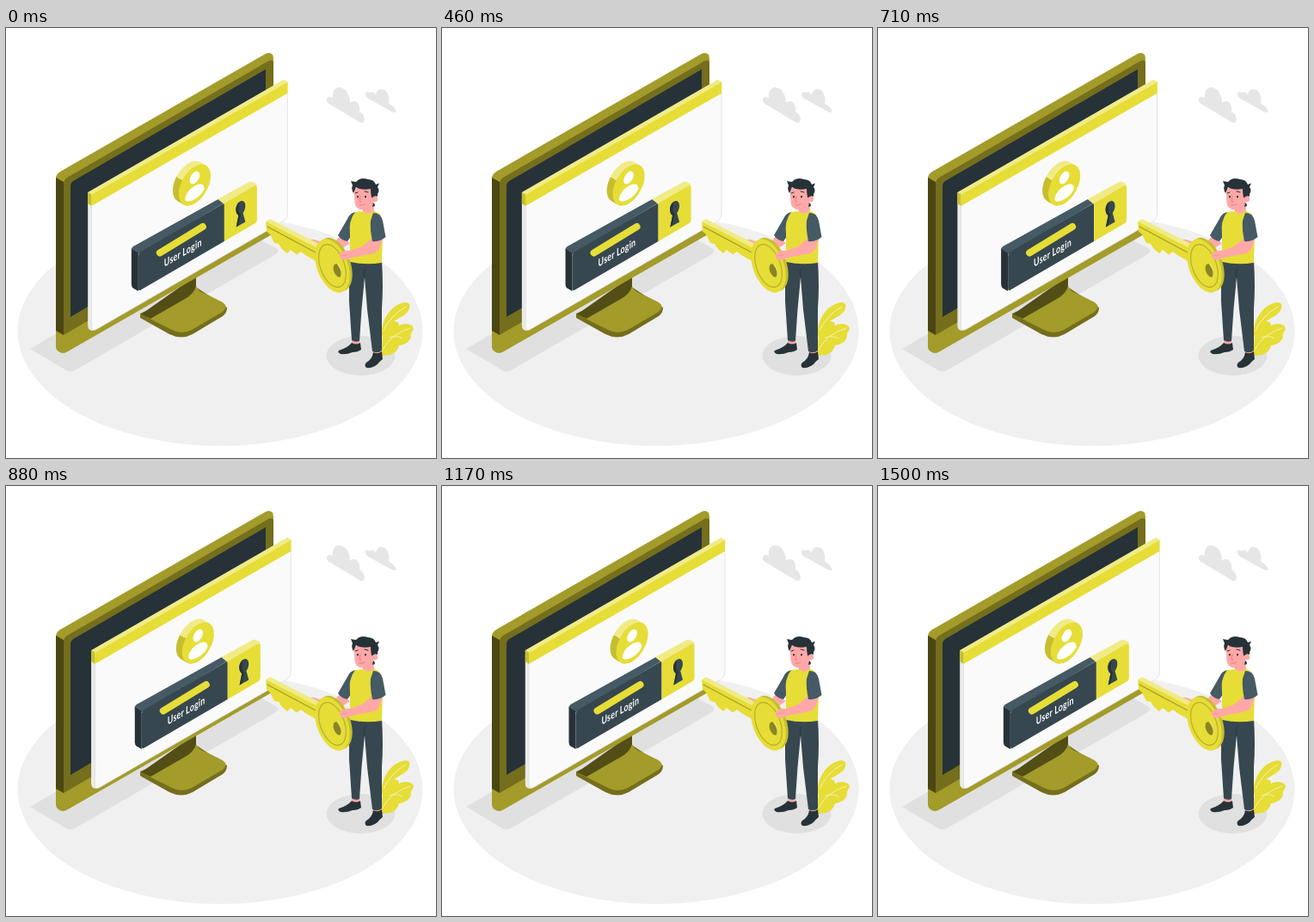
An HTML page that plays this animation: 500x500 px, repeating every 1540 ms.

```html
<!DOCTYPE html>
<html lang="en">
<head>
<meta charset="utf-8">
<title>User login</title>
<style>
html, body { margin: 0; width: 100%; height: 100%; overflow: hidden; background: #fff; }
svg { display: block; width: 100vw; height: 100vh; }
.y { fill: #e6dd37; } .yl { fill: #f0eb87; } .yd { fill: #c6be2f; }
.d { fill: #37474f; } .dd { fill: #263238; } .dl { fill: #455a64; }
.o { fill: #a39b2a; } .om { fill: #746e1d; } .od { fill: #4b4612; }
.g { fill: #e0e0e0; } .s { fill: #ffa8a7; }
.line { fill: none; stroke-linecap: round; stroke-linejoin: round; }
</style>
</head>
<body>
<svg viewBox="0 0 500 500">
  <defs>
    <linearGradient id="rim" gradientUnits="userSpaceOnUse" x1="-22" y1="8" x2="8" y2="-22">
      <stop offset=".45" stop-color="#c6be2f"/><stop offset=".45" stop-color="#f0eb87"/>
    </linearGradient>
  </defs>

  <!-- ground -->
  <ellipse cx="249" cy="352.5" rx="235.5" ry="133.5" fill="#f0f0f0"/>
  <path class="g" d="M28 373 L290 222 L290 243 L314 256 Q319 259 314 263 L80 398 Q75 401 70 398Z"/>
  <ellipse class="g" cx="412.5" cy="381" rx="40" ry="23"/>

  <!-- clouds -->
  <g fill="#e6e6e6">
    <path d="M373 84 Q373 78 380 81 Q379 71 386 69 Q395 68 399 80 Q400 83 400 87 Q406 82 410 89 Q412 93 411 97 Q416 100 417 106 Q417 111 412 110 L377 89 Q373 87 373 84Z"/>
    <path d="M418 77 Q418 73 422 75 Q428 73 430 78 Q430 72 436 71 Q443 71 445 80 Q446 84 445 88 Q450 90 453 95 Q455 99 450 98 L421 82 Q418 80 418 77Z"/>
  </g>

  <!-- plant -->
  <path class="y" d="M437 360 C435 340 447 322 464 319 Q471 319 469 326 C466 337 449 337 441 352Z"/>
  <path class="y" d="M437 381 C437 352 440 343 451 341 Q457 341 457 346 Q465 342 472 346 Q476 349 471 355 Q472 363 464 367 Q460 369 457 369 Q455 377 447 380Z"/>
  <path class="line" stroke="#f6f2ae" d="M439 352 Q446 335 465 324 M438 374 Q447 356 470 349 M446 360 Q455 357 461 361"/>

  <!-- stand -->
  <path class="om" d="M156 332 V337 L190 356 Q204 363 217 356 L252 335 Q257 331 257 325 L222 302Z"/>
  <path class="o" d="M221 286 V300 Q223 307 234 310 L252 319 Q259 324 252 330 L216 351 Q204 357 193 351 L157 333 L221 297Z"/>
  <path d="M157 333 L221 288 V300 Q219 309 208 315 L168 338Z" fill="#534e16"/>

  <!-- monitor -->
  <path class="o" d="M58 175 Q58 170 63 167 L300 31 Q306 27 310 31 Q311 33 311 39 V239 L72 376 Q66 380 61 376 Q58 374 58 370Z"/>
  <path class="om" d="M67 181 Q67 177 71 174 L304 39 Q311 35 311 42 V215 L67 357Z"/>
  <path class="od" d="M58 174 L67 179 V357 L58 352Z"/>
  <path class="dd" d="M75 183 Q75 180 78 178 L302 48 V202 L75 336Z"/>

  <!-- floating window -->
  <g id="win">
    <path d="M95.300 191 L100 194 V351 L102 352 Q95.300 352 95.300 346Z" fill="#ebebeb"/>
    <path d="M99.500 205 L327.500 75 V216 Q327.500 222 322.500 225 L106 350 Q99.500 354 99.500 348Z" fill="#fafafa" stroke="#dadada" stroke-width=".7"/>
    <path class="yl" d="M95.300 191 L323 60 L327.700 62.500 V66 L99.500 196Z"/>
    <path class="yd" d="M95.300 191 L99.500 193.500 V207 L95.300 204Z"/>
    <path class="y" d="M99.500 194 L327.700 63 V75.800 L99.500 207Z"/>

    <g transform="matrix(.866 -.5 0 1 219.5 182.5)">
      <path class="line" stroke="url(#rim)" stroke-width="42.8" d="M0 0 L-8 -8"/>
      <circle class="y" r="21.4"/>
      <circle cy="-8.500" r="6.700" fill="#fff"/>
      <path d="M-13 11 C-13 -2 13 -2 13 11 C9 18.500 -9 18.500 -13 11Z" fill="#fff"/>
    </g>

    <path class="dl" d="M146 258 Q146 255 149 253.500 L247 199 L254.500 203 L154 263Z"/>
    <path class="dd" d="M146 257 L154 262 V306 L148 302.500 Q146 301 146 298Z"/>
    <path class="d" d="M154 265 Q154 262 157 260 L254 203.500 V248 L157 304.500 Q154 306 154 303Z"/>
    <path class="yl" d="M246.500 199 L283 179 Q285 178 287 179 L292 182 L254 205Z"/>
    <path class="y" d="M254 204 L289 183.500 Q292 182 292 185 V223 Q292 225.500 290 227 L254 248Z"/>
    <path class="d" d="M267.500 211 C267.500 204 272 200.500 275 201 C280 202 279 211 275.700 215 L278.500 225.500 L267.800 231.500 L270.500 218 Q267.500 216 267.500 211Z"/>
    <path class="dd" d="M272 203 Q267.500 206 267.500 211 Q267.500 216 270.500 218 L267.800 231.500 L270 230 L273 217 Q269 213 272 203Z"/>
    <path class="line" stroke="#e6dd37" stroke-width="8" d="M179 261.500 L229 231"/>
    <text transform="matrix(.71 -.41 0 1 184 278)" font-family="Lato, sans-serif" font-size="12.500" font-weight="700" letter-spacing=".3" fill="#fff">User Login</text>
  </g>

  <!-- person: far arm and legs -->
  <path class="s" d="M388 242 L380 252 L364 248 Q356 244 352 247 Q351 250 356 252 L380 264 L400 250Z"/>
  <path class="dl" d="M406 214 Q400 215 397 222 L386 241 Q390 247 397 248 L405 237Z"/>
  <path class="s" d="M402 361 H411 V370 L402 371Z M428 372 H436 V382 L428 383Z"/>
  <path class="d" d="M399 270 L437 271 Q439 300 437 327 L437 375 Q432 379 426 376 L420 327 L417 290 L413.500 327 L411 364 Q406 366 402 363 L399 318Z"/>
  <path class="line" stroke="#263238" stroke-width=".8" d="M417 290 Q415 283 418 280"/>
  <path class="dd" d="M402 366 Q407 369 412 366 L413 374 Q409 377 403 377 Q396 380 389 379 Q385 377 387 375 Q397 372 402 366Z"/>
  <path class="dd" d="M427 377 Q432 380 437 376 L438 385 Q434 388 432 391 Q426 396 419 395 Q416 392 419 389 Q426 385 427 377Z"/>

  <!-- torso and head -->
  <path class="y" d="M406 214 L415 213 Q422 218 427 212 L434 216 Q439 225 438 240 L437 273 Q418 276 400 272 V240 Q398 224 406 214Z"/>
  <path class="s" d="M415 203 L427 200 L428 212 Q421 219 415 213Z"/>
  <path d="M415 209 Q421 208 425 203 Q423 211 415 212Z" fill="#f28f8f"/>
  <path class="s" d="M404.500 187 Q414 182 427 187 Q433 191 431 199 L427 201 Q424 211.500 415 211.500 Q406.500 211 405.500 203Z"/>
  <path class="dd" d="M404 192 Q401 187 403 183 L401 178 L407 179 Q412 173 421 176 Q428 176 430 182 L434 180.500 L432 185 Q435 189 432 193 L432 196 Q428 194 427 198 L425 197 Q424 192 424 187 Q413 189 407 185Z"/>
  <path class="dd" d="M427 203 Q429 204 429 207 L426 208Z"/>
  <circle class="s" cx="429" cy="199" r="3.200"/>
  <g class="line" stroke="#263238">
    <path d="M406 192 L409 191 M417 190 L421 191"/>
    <path stroke-width="2" d="M409 196 V196.500 M418 196 V196.500"/>
    <path stroke="#e87f80" d="M412 196 L411 202 L413 202 M411 206 Q414 207 417 205"/>
  </g>

  <!-- key -->
  <path class="yl" d="M302 225 L307 222 L366 252 L364 259Z"/>
  <path class="y" d="M302 225 L364 257 V273 L348 264 L343 260 L338 263.500 L331 258 L327 262 L321 257 L317 251 L312 250 L307 240 L303 236.500Z"/>
  <path class="line" stroke="#a39b2a" stroke-width="1.200" d="M304 231 L360 261"/>
  <ellipse class="yd" cx="382.500" cy="275" rx="18" ry="32.500" transform="rotate(-20 382.500 275)"/>
  <g transform="rotate(-20 379.500 276.500)">
    <ellipse class="y" cx="379.500" cy="276.500" rx="18" ry="32.500"/>
    <ellipse cx="379.500" cy="276.500" rx="14" ry="26" fill="none" stroke="#b8af2c" stroke-width="1.200"/>
  </g>
  <ellipse cx="385.500" cy="282" rx="4.300" ry="8" transform="rotate(-20 385.500 282)" fill="#8b8424"/>
  <path class="line" stroke="#eee872" stroke-width="1.200" d="M386 275 Q391 281 390 288"/>

  <!-- near arm -->
  <path class="s" d="M426 244 L414 254 L400 259 Q393 258 388 263 Q387 266 390 269 Q397 271 402 267 L428 262 Q436 259 438 242Z"/>
  <path class="line" stroke="#f28f8f" stroke-width=".8" d="M390 265 L397 264"/>
  <path class="dl" d="M427 215 Q436 215 438 224 L441.500 243 Q435 249 426 248 Q423 233 424 224Z"/>
</svg>
<script>
const LOOP = 1540, STEP = 1000 / 24, SHAKE = 1500;
const stops = [0, -1, 2, -4, 4, -4, 4, -4, 2, -1, 0];
const win = document.getElementById('win');

// Linear shake through ten equal legs.
function shake(ms) {
  const p = (ms % SHAKE) / SHAKE * 10;
  const i = Math.floor(p);
  return stops[i] + (stops[i + 1] - stops[i]) * (p - i);
}

function draw(ms) {
  const tick = Math.floor(((ms % LOOP) + 5) / STEP);
  const x = shake((Math.min(tick, 36) + 0.5) * STEP);
  win.setAttribute('transform', `translate(${x.toFixed(3)} 0)`);
}

const start = performance.now();
function loop() {
  draw(performance.now() - start);
  requestAnimationFrame(loop);
}
loop();
</script>
</body>
</html>
```
